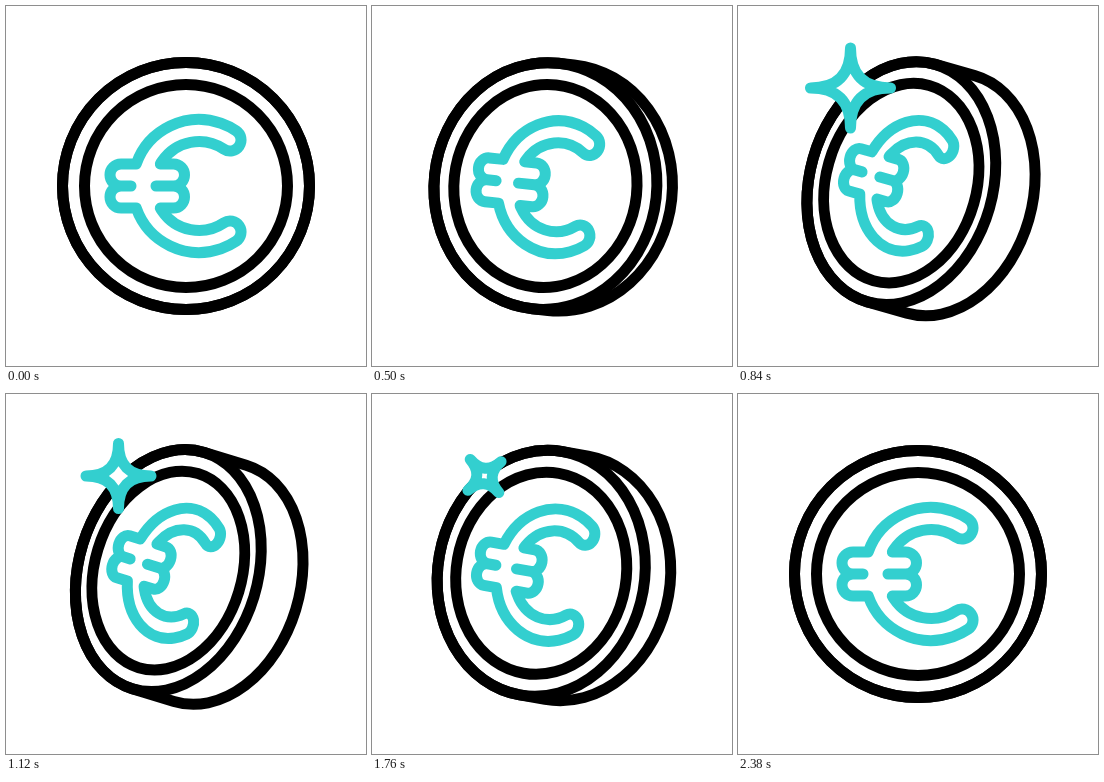
Write an HTML page with a canvas that moves like this. It is 360 px wide and 360 px high and loops after 2400 ms.

```html
<!DOCTYPE html>
<html>
<head>
<meta charset="utf-8">
<style>
  html, body { margin: 0; height: 100%; overflow: hidden; background: #fff; }
  canvas { display: block; width: 360px; height: 360px; }
</style>
</head>
<body>
<canvas id="stage" width="360" height="360"></canvas>
<script>
const ctx = document.getElementById('stage').getContext('2d');
const LOOP = 2400, TEAL = '#33cfcf', PI = Math.PI;
const RIM = 123.5, INNER = 101.5;

const clamp = x => Math.min(1, Math.max(0, x));
const mix = (a, b, k) => a + (b - a) * k;
const ramp = (t, from, to) => clamp((t - from) / (to - from));
const easeInOut = x => x < .5 ? 4 * x ** 3 : 1 - 4 * (1 - x) ** 3;
const smooth = x => x * x * (3 - 2 * x);

// Build the path under a transform, then stroke with an unscaled pen.
function outline(color, transform, build, fill) {
  ctx.save();
  transform();
  ctx.beginPath();
  build();
  ctx.restore();
  if (fill) {
    ctx.fillStyle = fill;
    ctx.fill();
  }
  ctx.strokeStyle = color;
  ctx.stroke();
}

// Upper half of the euro sign; side = -1 mirrors it.
function euroHalf(side) {
  const cx = 13, outer = 66.5, inner = 44.5, mid = 55.5, cap = 11, end = -56 * PI / 180;
  ctx.save();
  ctx.scale(1, side);
  ctx.moveTo(-55, 0);
  ctx.lineTo(-65, 0);
  ctx.arc(-65, -cap, cap, PI / 2, 1.5 * PI);
  ctx.arc(cx, 0, outer, PI + Math.asin(2 * cap / outer), 2 * PI + end);
  ctx.arc(cx + mid * Math.cos(end), mid * Math.sin(end), cap, end, end + PI);
  ctx.arc(cx, 0, inner, end, PI + Math.asin(2 * cap / inner), true);
  ctx.arc(-12.5, -cap, cap, -PI / 2, PI / 2);
  ctx.lineTo(-30, 0);
  ctx.restore();
}

function drawCoin(p) {
  const squash = mix(1, .725, p), front = -18.5 * p, back = 25.2 * p;
  const tilt = () => {
    ctx.translate(180, 180 + 2 * p);
    ctx.rotate(p * 17 * PI / 180);
  };
  const face = () => {
    tilt();
    ctx.translate(front, 0);
    ctx.scale(squash, 1);
  };
  const ring = r => () => ctx.arc(0, 0, r, 0, 2 * PI);

  outline('#000', tilt, () => {
    ctx.ellipse(back, 0, RIM * squash, RIM, 0, -PI / 2, PI / 2);
    ctx.ellipse(front, 0, RIM * squash, RIM, 0, PI / 2, 1.5 * PI);
    ctx.closePath();
  });
  outline('#000', face, ring(RIM));
  outline('#000', face, ring(INNER));
  outline(TEAL, face, () => { euroHalf(1); euroHalf(-1); });
}

function drawStar(size, angle) {
  if (size <= 0) return;
  const r = 32.5 * size;
  outline(TEAL, () => {
    ctx.translate(112.5, 82);
    ctx.rotate(angle * PI / 180);
  }, () => {
    ctx.moveTo(0, -r);
    for (const [x, y] of [[r, 0], [0, r], [-r, 0], [0, -r]]) ctx.quadraticCurveTo(0, 0, x, y);
    ctx.closePath();
  }, '#fff');
}

function draw(t) {
  ctx.fillStyle = '#fff';
  ctx.fillRect(0, 0, 360, 360);
  ctx.lineWidth = 11;
  ctx.lineCap = ctx.lineJoin = 'round';

  drawCoin(t < 1200 ? easeInOut(ramp(t, 0, 1120)) : 1 - easeInOut(ramp(t, 1200, LOOP)));

  // The star pops in past full size, settles, and leaves the same way.
  const s = t < 1220 ? t : 2440 - t;
  const size = 1.26 * ramp(s, 540, 800) - .26 * smooth(ramp(s, 810, 960));
  drawStar(size, mix(-76, 0, ramp(s, 540, 840)));
}

function tick() {
  draw(performance.now() % LOOP);
  requestAnimationFrame(tick);
}
tick();
</script>
</body>
</html>
```
